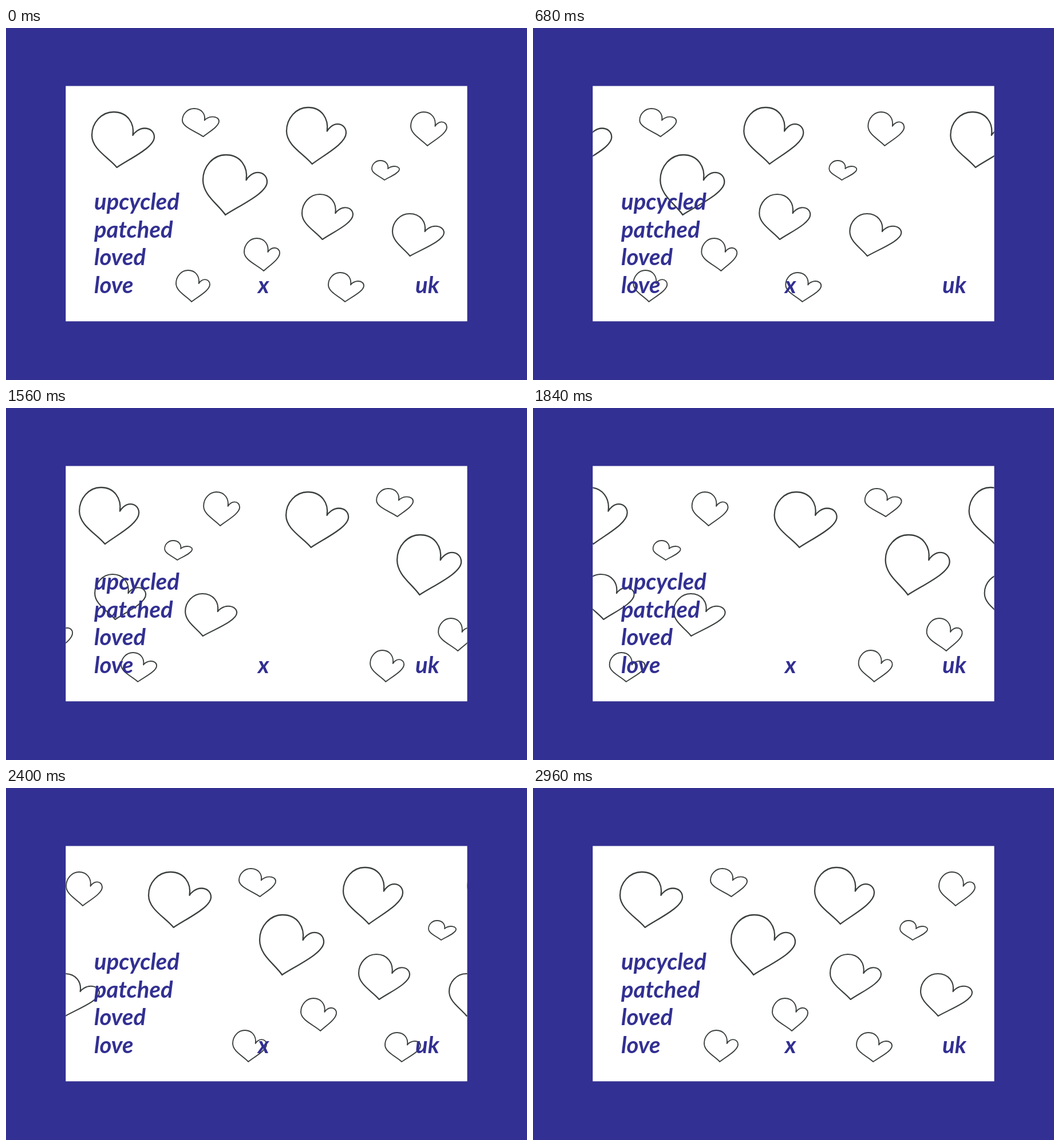
These frames come from a looping animation (910x616 px, 3 s). An HTML page with a canvas:

```html
<!DOCTYPE html>
<html lang="en">
<head>
<meta charset="utf-8">
<title>Drifting hearts</title>
<style>
  html, body { margin: 0; width: 100%; height: 100%; overflow: hidden; background: #323092; }
  canvas { display: block; }
</style>
</head>
<body>
<canvas id="stage" width="910" height="616"></canvas>
<script>
const ctx = document.getElementById('stage').getContext('2d');
const BLUE = '#323092';
const CARD = [104.3, 101.5, 701.3, 411.8];
const LOOP = 3000, STEP = 40, SPAN = 701;

// A lopsided heart drawn in its box; lean places the tip along the width
function makeHeart(x, y, w, h, lean) {
  const path = new Path2D();
  const curve = (...p) => path.bezierCurveTo(...p.map((v, i) => i % 2 ? y + v * h : x + v * w));
  const cleftX = 0.3 + 0.4 * h / w, cleftY = 0.42;
  const bigX = 0.53 * cleftX;
  const smallX = cleftX + 0.55 * (1 - cleftX), smallY = 0.7 * cleftY;
  path.moveTo(x + cleftX * w, y + cleftY * h);
  curve(cleftX + 0.03, 0.2, bigX + 0.72 * (cleftX - bigX), 0, bigX, 0);
  curve(0.45 * bigX, 0, 0, 0.19, 0, 0.42);
  curve(0, 0.67, 0.67 * lean, 0.82, lean, 1);
  curve(lean + 0.35 * (1 - lean), 0.84, 1, 0.64, 1, 0.45);
  curve(1, 0.36, smallX + 0.6 * (1 - smallX), smallY, smallX, smallY);
  curve((smallX + cleftX) / 2, smallY, cleftX + 0.02, 0.38, cleftX, cleftY);
  path.closePath();
  return { path, width: 1.4 + w / 120 };
}

const hearts = [
  [150, 147, 109, 97, 0.4], [308, 141, 64, 49, 0.57], [490, 139, 104, 99, 0.43],
  [707, 147, 63, 59, 0.46], [344, 222, 112, 105, 0.35], [639, 232, 48, 34, 0.46],
  [517, 291, 89, 79, 0.4], [675, 325, 90, 74, 0.34], [416, 368, 62, 57, 0.55],
  [297, 424, 59, 55, 0.46], [563, 428, 62, 51, 0.47]
].map(box => makeHeart(...box));

// Steady travel slowed at the ends and gently around the middle
function drift(t) {
  const a = 2 * Math.PI * t / LOOP;
  return SPAN * t / LOOP - 33 * Math.sin(a) - 21.5 * Math.sin(2 * a) - 3 * Math.sin(4 * a);
}

function draw(t) {
  ctx.fillStyle = BLUE;
  ctx.fillRect(0, 0, 910, 616);
  ctx.fillStyle = '#fff';
  ctx.fillRect(...CARD);

  ctx.save();
  ctx.beginPath();
  ctx.rect(...CARD);
  ctx.clip();
  ctx.strokeStyle = '#3b403f';
  ctx.lineJoin = 'round';
  ctx.translate(-drift(t), 0);
  for (let copy = 0; copy < 2; copy++) {
    for (const heart of hearts) {
      ctx.lineWidth = heart.width;
      ctx.stroke(heart.path);
    }
    ctx.translate(SPAN, 0);
  }
  ctx.restore();

  ctx.fillStyle = BLUE;
  ctx.font = 'italic bold 40px Lato, sans-serif';
  ['upcycled', 'patched', 'loved', 'love'].forEach((word, i) => ctx.fillText(word, 154, 318 + 48.7 * i));
  ctx.fillText('x', 440, 464);
  ctx.fillText('uk', 715, 464);
}

const start = performance.now();
function tick() {
  const t = (performance.now() - start) % LOOP;
  draw(Math.floor(t / STEP) * STEP);
  requestAnimationFrame(tick);
}
tick();
</script>
</body>
</html>
```
